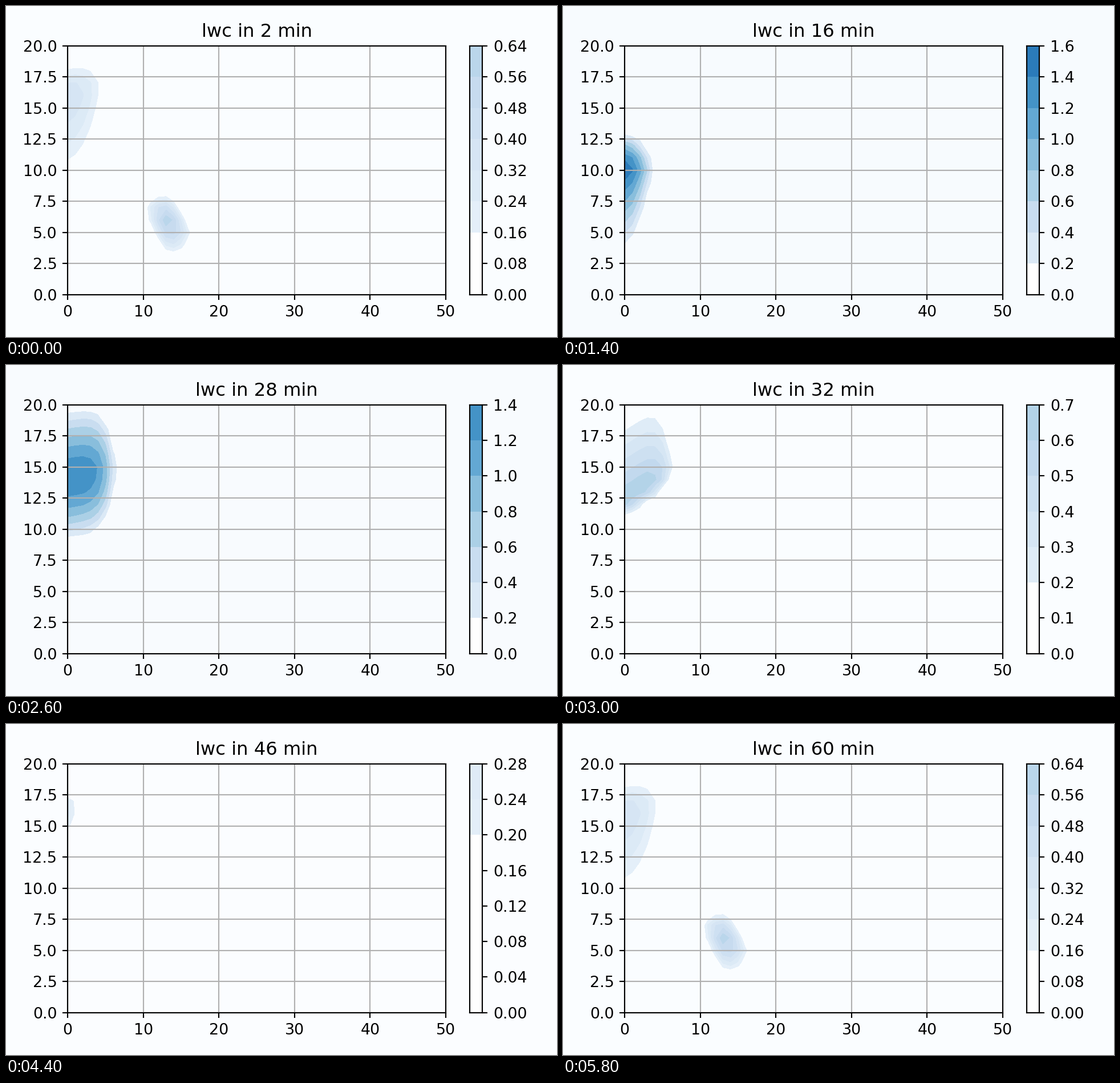
These frames come from a looping animation (966x580 px, 6 s). A matplotlib script:

```python
import numpy as np
import matplotlib.pyplot as plt
from matplotlib.animation import FuncAnimation
from matplotlib.ticker import MaxNLocator

W, H, DPI = 966, 580, 193.2
FRAMES, INTERVAL = 30, 200
X, Y = np.meshgrid(np.arange(51), np.arange(21))
VISIBLE, FULL = .19, 2.1
BLUES = plt.get_cmap("Blues")

plt.rcParams.update({"font.family": "DejaVu Sans", "font.size": 10})

# Key poses: minute, peak, centre x, centre y, lean,
# then half width, height above and depth below, each with its exponent.
CLOUD = np.array([
    (8, 0, 0, 5, 0, 3.95, 1.7, 3.1, 1.7, 6.7, 1),
    (16, 1.58, 0, 10, 0, 3.95, 1.7, 3.1, 1.7, 6.7, 1),
    (24, 2.07, 0, 16, -.2, 6.2, 3.5, 3.4, 2, 9, .7),
    (32, .68, 0, 12.8, .4, 6.7, 5, 7.5, .9, 1.9, 3),
    (40, .32, 0, 16.4, 0, 4.2, 1, 1.8, 3, 2.6, 3),
    (52, .19, 0, 16.4, 0, 4.2, 1, 1.8, 3, 2.6, 3),
    (60, .38, 0, 15.8, .2, 5.4, 2, 3, 2, 7.3, 1.4)])
CELL = np.array([
    (46, 0, 7.3, 6.3, 0, 1.9, 2, 1.7, 2, 1.4, 2),
    (52, .39, 7.3, 6.3, 0, 1.9, 2, 1.7, 2, 1.4, 2),
    (60, .64, 13.3, 5.9, -.35, 3.4, 1.5, 2.35, 1.5, 2.9, 1.5)])


def water(keys, t):
    """Liquid water of one leaning blob on the model grid at minute t."""
    peak, cx, cy, lean, wide, pw, up, pu, down, pd = (
        np.interp(t, keys[:, 0], col) for col in keys.T[1:])
    dx = X - cx
    dy = Y - cy - lean * dx
    side = np.abs(dx / wide) ** pw
    rise = np.where(dy > 0, np.abs(dy / up) ** pu, np.abs(dy / down) ** pd)
    return peak * np.clip(1 - side - rise, 0, 1)


def levels_for(top):
    if top == 0:
        return np.array([-2.5e-14, 0, 2.5e-14])
    lv = MaxNLocator(8, min_n_ticks=1).tick_values(0, top)
    lv = lv[lv > -1e-9]
    return lv[:np.searchsorted(lv, top, "right") + 1]


def tone(v):
    return BLUES(v / FULL) if v >= VISIBLE else (1, 1, 1, 1)


def paper(top):
    """Background, slightly darker when the cloud is dense."""
    u = (top / FULL) ** 2
    return tuple((np.array([251, 253, 255]) - u * np.array([7, 4, 2])) / 255)


# The small surplus keeps rounding from losing a pixel.
fig = plt.figure(figsize=((W + .01) / DPI, (H + .01) / DPI), dpi=DPI)
BOTTOM, HEIGHT = 74.4 / H, 435.8 / H
ax = fig.add_axes([108.2 / W, BOTTOM, 662.8 / W, HEIGHT])
cax = fig.add_axes([813.3 / W, BOTTOM, 21.7 / W, HEIGHT])


def draw_plot(z, lv, mids, minute):
    ax.clear()
    ax.set_facecolor("none")
    first = np.searchsorted(mids, VISIBLE)
    if first < len(mids):
        ax.contourf(X, Y, z, levels=lv[first:],
                    colors=[tone(m) for m in mids[first:]])
    ax.set(xlim=(0, 50), ylim=(0, 20), xticks=range(0, 51, 10),
           yticks=np.arange(0, 20.1, 2.5), title=f"lwc in {minute} min")
    ax.grid(True)


def draw_bar(lv, mids):
    cax.clear()
    for lo, hi, m in zip(lv, lv[1:], mids):
        cax.axhspan(lo, hi, color=tone(m), lw=0)
    cax.set_xticks([])
    cax.yaxis.tick_right()
    cax.set_yticks(lv)
    cax.set_ylim(lv[0], lv[-1])


def update(i):
    minute = 2 * (i + 1)
    t = minute if i else 60  # the loop opens on the final state
    z = water(CLOUD, t) + water(CELL, t)
    top = z.max()
    lv = levels_for(top)
    mids = (lv[1:] + lv[:-1]) / 2
    fig.set_facecolor(paper(top))
    draw_plot(z, lv, mids, minute)
    draw_bar(lv, mids)
    return []


anim = FuncAnimation(fig, update, frames=FRAMES, interval=INTERVAL,
                     init_func=lambda: update(0), repeat=True,
                     repeat_delay=0, blit=False)
plt.show()
```
